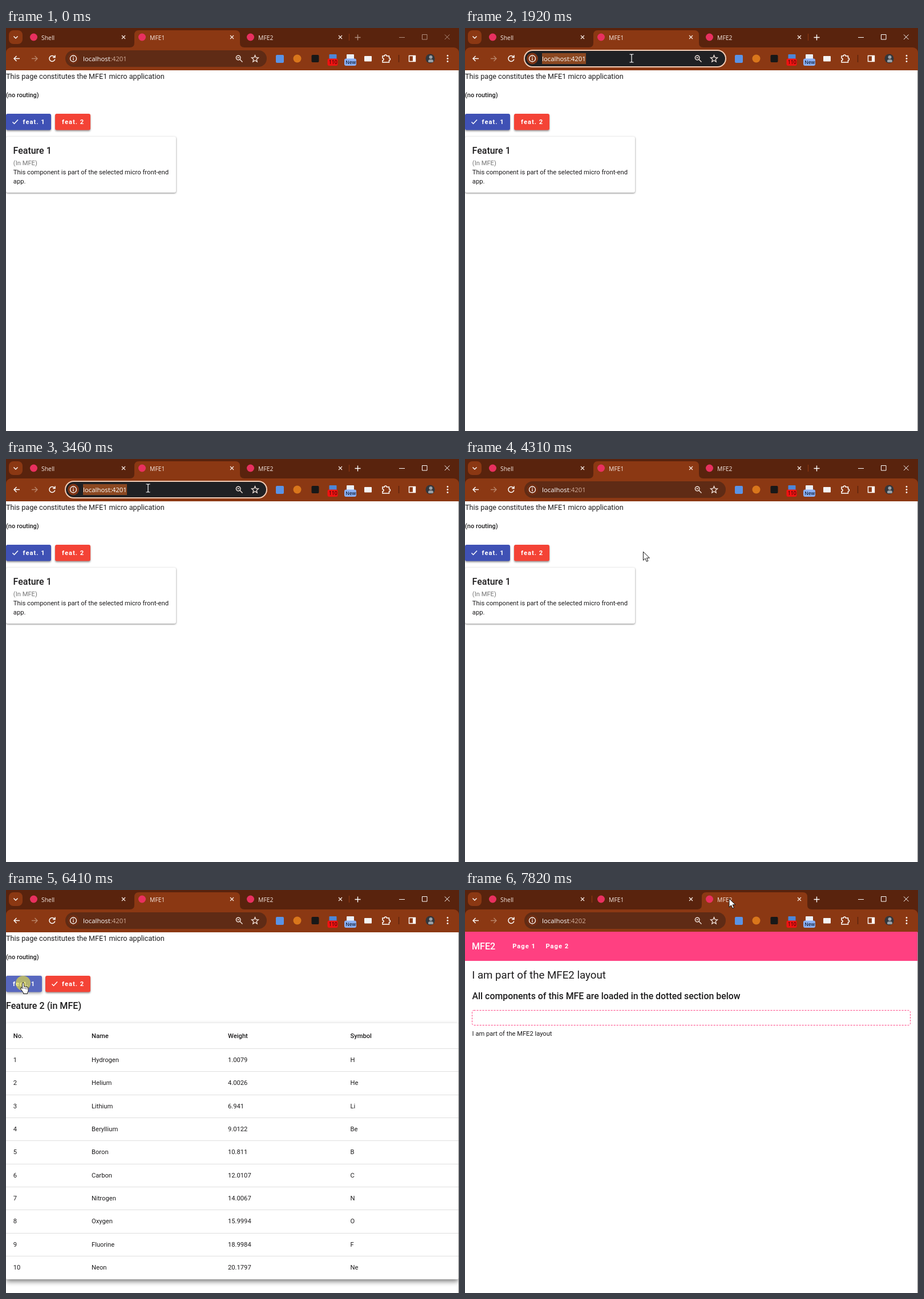
These frames come from a looping animation (794x705 px, 8 s). An HTML page with a canvas:

```html
<!DOCTYPE html>
<html lang="en">
<head>
<meta charset="utf-8">
<title>Micro front-ends</title>
<style>
html, body { margin: 0; width: 794px; height: 705px; overflow: hidden; background: #fff; }
canvas { display: block; }
</style>
</head>
<body>
<canvas id="stage" width="794" height="705"></canvas>
<script>
const ctx = document.getElementById('stage').getContext('2d');
const LOOP = 8000;
const UI = '"Open Sans", sans-serif', PAGE = 'Roboto, sans-serif';
const STRIP = '#59230d', BAR = '#8b3813', PINK = '#ff4081', INK = '#1c1b1c';

// Pointer stops: time, x, y
const path = [
  [500, 747, 668], [1260, 425, 62], [1390, 237, 53], [1660, 237, 53], [1910, 292, 53],
  [2120, 292, 53], [2330, 320, 54], [2860, 105, 55], [2990, 105, 55], [3200, 150, 73],
  [3460, 249, 51], [3720, 249, 51], [4030, 405, 162], [4220, 405, 162], [4500, 32, 163],
  [4990, 32, 163], [5260, 98, 161], [5810, 98, 161], [6200, 30, 163], [6680, 30, 163],
  [7020, 254, 51], [7420, 433, 14], [7490, 433, 14], [7600, 463, 15]
];
const clicks = [1590, 4060, 5430, 6340, 7620];
const elements = [
  ['Hydrogen', '1.0079', 'H'], ['Helium', '4.0026', 'He'], ['Lithium', '6.941', 'Li'],
  ['Beryllium', '9.0122', 'Be'], ['Boron', '10.811', 'B'], ['Carbon', '12.0107', 'C'],
  ['Nitrogen', '14.0067', 'N'], ['Oxygen', '15.9994', 'O'], ['Fluorine', '18.9984', 'F'],
  ['Neon', '20.1797', 'Ne']
];

function pointer(t) {
  if (t < path[0][0]) return null;
  const i = path.findIndex(p => p[0] > t);
  if (i < 0) return path.at(-1).slice(1);
  const [t0, x0, y0] = path[i - 1], [t1, x1, y1] = path[i];
  const u = (t - t0) / (t1 - t0), e = u * u * (3 - 2 * u);
  return [x0 + (x1 - x0) * e, y0 + (y1 - y0) * e];
}

function text(str, x, y, size, color = INK, weight = 400, family = PAGE, spacing = 0) {
  ctx.font = `${weight} ${size}px ${family}`;
  ctx.letterSpacing = spacing + 'px';
  ctx.fillStyle = color;
  ctx.fillText(str, x, y);
}
function rect(x, y, w, h, color, radius = 0) {
  ctx.fillStyle = color;
  ctx.beginPath();
  ctx.roundRect(x, y, w, h, radius);
  ctx.fill();
}
function circle(x, y, r, color) {
  ctx.fillStyle = color;
  ctx.beginPath();
  ctx.arc(x, y, r, 0, 7);
  ctx.fill();
}
function line(d, color = '#fff', width = 1.4, fill) {
  const p = new Path2D(d);
  if (fill) { ctx.fillStyle = fill; ctx.fill(p); }
  ctx.strokeStyle = color;
  ctx.lineWidth = width;
  ctx.stroke(p);
}
function raised(dy, blur, alpha, draw) {
  ctx.save();
  ctx.shadowColor = `rgba(0,0,0,${alpha})`;
  ctx.shadowOffsetY = dy;
  ctx.shadowBlur = blur;
  draw();
  ctx.restore();
}

function tabs(active, focused) {
  rect(0, 0, 794, 44, STRIP);
  rect(5, 4, 24, 24, BAR, 8);
  line('M13.5 14.5l3.5 3.5 3.5-3.5');
  ['Shell', 'MFE1', 'MFE2'].forEach((name, i) => {
    const x = 35 + i * 190;
    if (i === active) {
      ctx.fillStyle = BAR;
      ctx.fill(new Path2D(`M${x - 8} 34q8 0 8-8V12q0-8 8-8h169q8 0 8 8v14q0 8 8 8z`));
    }
    circle(x + 13.5, 16, 6.5, '#e8305f');
    text(name, x + 27, 20.5, 10.4, '#f6e9e2', 400, UI);
    line(`M${x + 168} 13l6 6m0-6l-6 6`, '#f6e9e2', 1.3);
  });
  line(active === 1 ? 'M601.5 10v12' : 'M222.5 10v12', BAR, 1.2);
  const tone = focused ? '#fff' : '#b18e7e';
  line('M611.5 16.5h10m-5-5v10', tone, 1.4);
  line('M689 16.5h10M729.5 11.5h8.5v8.5h-8.5zM769 11.5l8.5 8.5m0-8.5l-8.5 8.5', tone, 1);
}

function addressBar(port, focused, hovered) {
  rect(0, 34, 794, 40, BAR, [9, 9, 0, 0]);
  line('M24 53.5h-10m4.5-4.5l-4.5 4.5 4.5 4.5');
  line('M45 53.5h10m-4.5-4.5l4.5 4.5-4.5 4.5', '#b98569');
  line('M85 50.5a5 5 0 1 0 .8 4M86 47.5v4h-4', '#fff', 1.5);
  if (focused) {
    rect(103, 38, 355, 31, '#f5cdb5', 15.5);
    rect(105, 40, 351, 27, '#202124', 13.5);
    rect(135, 44, 77, 19, '#8b4821');
  } else {
    rect(104, 39, 353, 29, hovered ? '#67341e' : '#5f2b15', 14.5);
  }
  circle(118, 53.5, 10, focused ? '#7d3415' : '#6f2d12');
  line('M123.5 53.5a5.5 5.5 0 1 1-11 0a5.5 5.5 0 1 1 11 0M118 52.5v4M118 50v1.4', '#fff', 1.3);
  text('localhost', 135, 57.7, 11.4, '#fff', 400, UI);
  text(':' + port, 135 + ctx.measureText('localhost').width, 57.7, 11.4,
    focused ? '#fff' : '#d0ac99', 400, UI);
  line('M411 52a3.8 3.8 0 1 1-7.6 0a3.8 3.8 0 1 1 7.6 0M410 55l4.5 4.5M405.5 52h3.4', '#f3e6df', 1.4);
  const star = Array.from({ length: 10 }, (_, i) => {
    const a = i * Math.PI / 5, r = i % 2 ? 2.8 : 6.3;
    return `${436.5 + r * Math.sin(a)} ${54 - r * Math.cos(a)}`;
  });
  line(`M${star.join('L')}Z`, '#f3e6df', 1.3);
}

function extensions() {
  rect(473, 47, 14, 14, '#5a93e6', 2);
  circle(510.5, 53.5, 7, '#d9761b');
  rect(535.5, 47, 13, 13, '#181818', 2);
  rect(566.5, 46, 13, 10, '#4c86d8', 1);
  rect(563.5, 53.5, 18, 12.5, '#f01212', 3);
  text('110', 566, 63, 8.6, '#260000', 400, UI);
  rect(597, 46, 13, 10, '#e9eef8', 1);
  rect(593, 53.5, 21, 12.5, '#8ab0f5', 3);
  text('New', 595.2, 63, 8.4, '#14203a', 600, UI);
  rect(628, 49, 13, 9.5, '#f4f4f4', 1);
  line('M660 49h3.3a2 2 0 1 1 4 0h4.2v3.6a2 2 0 1 1 0 4v3.4h-11.5v-3.2a2 2 0 0 0 0-4z', '#fff', 1.5);
  line('M688.5 47v13', '#5a230d', 1.4);
  line('M706.5 48.5h11v10h-11z', '#fff', 1.4);
  rect(713, 48, 5, 11, '#fff');
  circle(743.5, 53.5, 8, '#33363b');
  circle(744.5, 51, 3, '#9aa0a6');
  rect(740, 55, 9, 5, '#9aa0a6', [4, 4, 2, 2]);
  for (const y of [48.5, 53.5, 58.5]) circle(774, y, 1.4, '#fff');
}

function featureButton(label, x, w, textX, color, selected, glow) {
  raised(2, 3 + glow * 20, 0.4, () => rect(x, 150, w, 28.5, color, 3));
  rect(x, 150, w, 28.5, `rgba(255,255,255,${glow})`, 3);
  if (selected) line(`M${x + 11.5} 164.5l3 3 6.5-7`, '#fff', 1.5);
  text(label, textX, 167.5, 11.2, '#fff', 600, PAGE, 1);
}

function buttonBoxes(table) {
  return table ? [[0, 63], [69, 79]] : [[0, 79], [86, 62]];
}
function inButton(p, [x, w]) {
  return p && p[0] >= x && p[0] <= x + w && p[1] > 150 && p[1] < 179;
}
function featurePage(t, table, pressed) {
  text('This page constitutes the MFE1 micro application', 0, 89, 12.64);
  text('(no routing)', 0, 121, 11, INK, 500);
  const glow = buttonBoxes(table).map(box => {
    const hits = [0, 50, 100, 150].filter(lag => inButton(pointer(t - lag), box)).length;
    return hits * 0.025 + (pressed && inButton(pointer(t), box) ? 0.03 : 0);
  });
  const [a, b] = buttonBoxes(table);
  featureButton('feat. 1', ...a, table ? 12 : 29.5, '#3f51b5', !table, glow[0]);
  featureButton('feat. 2', ...b, 98, '#f44336', table, glow[1]);
  if (table) elementTable(); else card();
}
function card() {
  raised(1, 3, 0.5, () => rect(0, 190, 298, 98, '#fff', 3));
  text('Feature 1', 12.5, 220, 16, INK, 500);
  text('(In MFE)', 12.8, 240, 11.2, '#757575');
  text('This component is part of the selected micro front-end', 12.8, 256, 11.26);
  text('app.', 12.8, 272, 11.26);
}
function elementTable() {
  text('Feature 2 (in MFE)', 0, 208, 16.1, INK, 500);
  raised(4, 9, 0.5, () => rect(0, 233, 793, 448, '#fff', 2));
  const columns = [12.8, 150, 389, 603.5];
  ['No.', 'Name', 'Weight', 'Symbol'].forEach((s, i) => text(s, columns[i], 258.5, 11.2, INK, 500));
  elements.forEach((row, r) => {
    const y = 277 + r * 40.33;
    rect(0, Math.round(y), 793, 1, '#dfdfdf');
    [String(r + 1), ...row].forEach((s, i) => text(s, columns[i], Math.round(y + 24), 11.2));
  });
}

function layoutPage() {
  rect(0, 73, 793, 51, PINK);
  text('MFE2', 12, 103.7, 16.1, '#fff', 500);
  text('Page 1', 83.2, 102, 11.2, '#fff', 600, PAGE, 1);
  text('Page 2', 141.4, 102, 11.2, '#fff', 600, PAGE, 1);
  text('I am part of the MFE2 layout', 12.2, 155, 18.7);
  text('All components of this MFE are loaded in the dotted section below', 12.5, 190.5, 15.87, INK, 500);
  ctx.setLineDash([3, 2]);
  ctx.strokeStyle = PINK;
  ctx.lineWidth = 1;
  ctx.beginPath();
  ctx.roundRect(12.5, 210.5, 768, 26, 3);
  ctx.stroke();
  ctx.setLineDash([]);
  text('I am part of the MFE2 layout', 12.6, 255, 11.15);
}

function inAddress([x, y]) {
  return x > 104 && x < 457 && y > 39 && y < 68;
}
function drawPointer(p, hand, pressed) {
  if (pressed) circle(...p, 13, 'rgba(238,228,62,.62)');
  ctx.save();
  ctx.translate(...p);
  ctx.lineJoin = 'round';
  if (inAddress(p)) {
    line('M-3.5-7h2.5l1 1 1-1h2.5M0-6v12M-3.5 7h2.5l1-1 1 1h2.5', '#fff', 1.2);
  } else if (hand) {
    line('M-1.5 1q0-2 1.5-2t1.5 2v5q2.5-1.5 3 .5q2.3-1 2.7.8q2-.4 2 1.5v3q0 3-1.6 4.7v2H.5v-1.7L-4 10.5q-1.4-2 0-2.6t2.5 1.6z', '#111', 1, '#fff');
    line('M1.5 7v3M4.5 7.5v3M7 8.5v2.5', '#111', 0.8);
  } else {
    line('M0 0v15l3.5-3.3 2.4 5.4 2.5-1.1-2.3-5.2h4.9z', '#111', 1, '#fff');
  }
  ctx.restore();
}

function render(t) {
  const p = pointer(t);
  const pressed = clicks.some(c => t >= c && t < c + 170);
  const table = t >= 5540 && t < 6490;
  const second = t >= 7690;
  const editing = t >= 1650 && t < 4150;
  rect(0, 0, 794, 705, '#fff');
  tabs(second ? 2 : 1, t >= 1590);
  addressBar(second ? '4202' : '4201', editing, p && inAddress(p));
  extensions();
  if (second) layoutPage(); else featurePage(t, table, pressed);
  rect(793, 74, 1, 631, '#858585');
  if (p) drawPointer(p, !second && buttonBoxes(table).some(box => inButton(p, box)), pressed);
}
function frame() {
  render(performance.now() % LOOP);
  requestAnimationFrame(frame);
}
frame();
</script>
</body>
</html>
```
